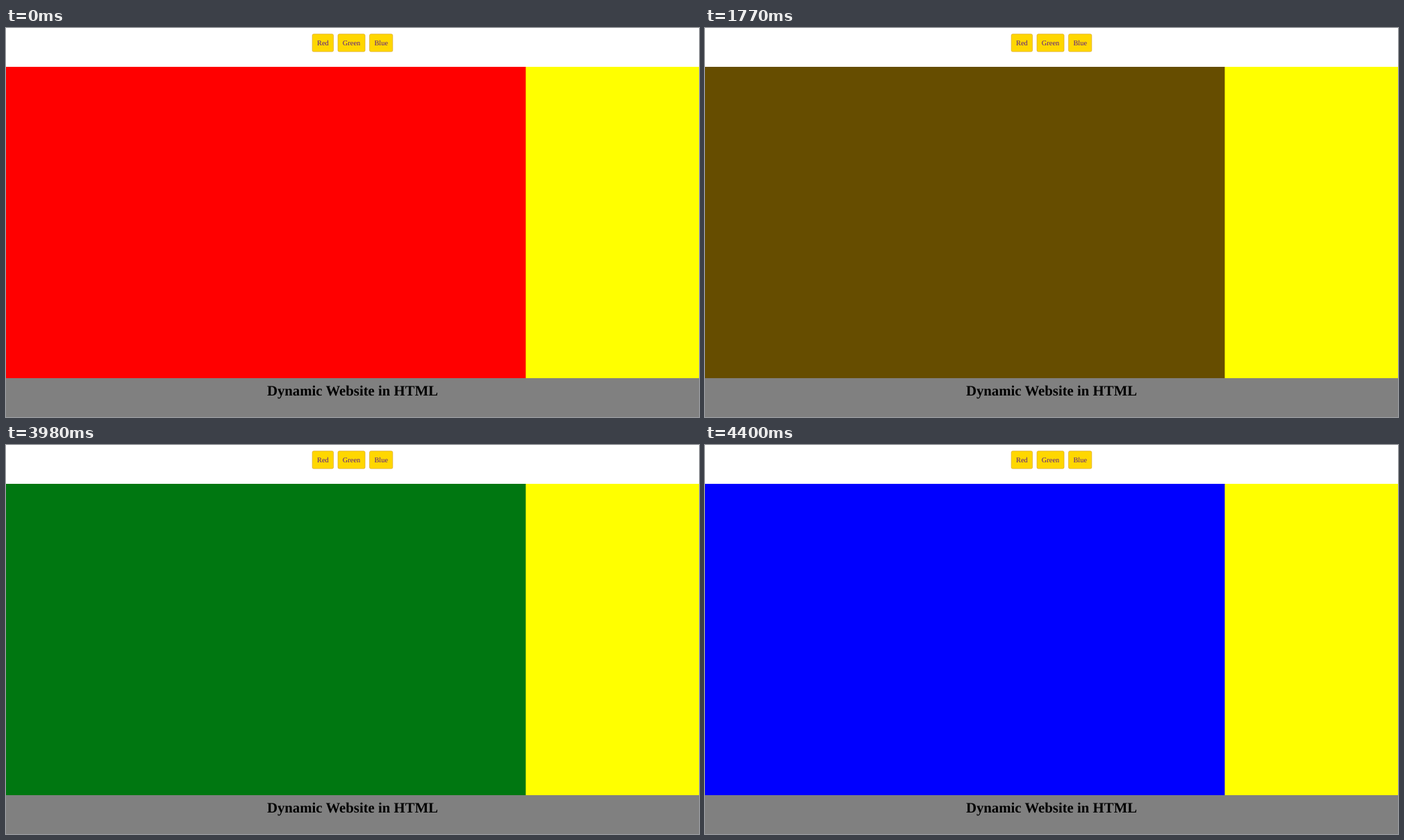
Animation of 998x561 px, one loop 5.9 s. Source, as an HTML page with a canvas:

```html
<!DOCTYPE html>
<html lang="en">
<head>
<meta charset="utf-8">
<title>Dynamic Website</title>
<style>
  html, body { margin: 0; width: 100%; height: 100%; overflow: hidden; background: #fff; }
  canvas { display: block; }
</style>
</head>
<body>
<canvas id="stage" width="998" height="561"></canvas>
<script>
const ctx = document.getElementById('stage').getContext('2d');
const WIDTH = 998, HEIGHT = 561, LOOP = 5900;
const PAGE_WIDTH = 1536, SCALE = WIDTH / PAGE_WIDTH;
const HEADER = 56, FOOTER = 505, SIDEBAR = 748.5;
const SERIF = '"Liberation Serif", "Times New Roman", serif';
const STEP = 30, STEPS = 15;

const RED = [255, 0, 0], GREEN = [0, 128, 0], BLUE = [0, 0, 255];
const fades = [
  { start: 1530, from: RED, to: GREEN },
  { start: 3980, from: GREEN, to: BLUE }
];

function panelColor(time) {
  let color = RED;
  for (const { start, from, to } of fades) {
    if (time < start) break;
    const mix = Math.min(Math.floor((time - start) / STEP) + 1, STEPS) / STEPS;
    color = from.map((value, i) => Math.round(value + (to[i] - value) * mix));
  }
  return `rgb(${color.join(',')})`;
}

function fillRect(color, x, y, right, bottom) {
  ctx.fillStyle = color;
  ctx.fillRect(x, y, right - x, bottom - y);
}

function drawButtons() {
  const labels = ['Red', 'Green', 'Blue'];
  const inset = 11, gap = 9, top = 13, height = 40;
  ctx.font = `16px ${SERIF}`;
  ctx.textAlign = 'left';
  const widths = labels.map(label => ctx.measureText(label).width + 2 * inset);
  const total = widths.reduce((sum, width) => sum + width, gap * (labels.length - 1));
  let x = (PAGE_WIDTH - total) / 2;
  labels.forEach((label, i) => {
    ctx.beginPath();
    ctx.roundRect(x + 0.5, top + 0.5, widths[i] - 1, height - 1, 3);
    ctx.fillStyle = 'gold';
    ctx.fill();
    ctx.strokeStyle = 'goldenrod';
    ctx.lineWidth = 1;
    ctx.stroke();
    ctx.fillStyle = '#551a8b';
    ctx.fillText(label, x + inset, top + 25.5);
    x += widths[i] + gap;
  });
}

function drawHeading() {
  ctx.font = `bold 32px ${SERIF}`;
  ctx.textAlign = 'center';
  ctx.fillStyle = '#000';
  ctx.fillText('Dynamic Website in HTML', PAGE_WIDTH / 2, 815);
}

function draw(time) {
  fillRect('#fff', 0, 0, WIDTH, HEADER);
  fillRect('#ff0', 0, HEADER, WIDTH, FOOTER);
  fillRect(panelColor(time), 0, HEADER, SIDEBAR, FOOTER);
  fillRect('#808080', 0, FOOTER, WIDTH, HEIGHT);

  // Text and buttons are laid out in page units.
  ctx.save();
  ctx.scale(SCALE, SCALE);
  ctx.textRendering = 'geometricPrecision';
  drawButtons();
  drawHeading();
  ctx.restore();
}

const begin = performance.now();
function tick() {
  draw((performance.now() - begin) % LOOP);
  requestAnimationFrame(tick);
}
tick();
</script>
</body>
</html>
```
